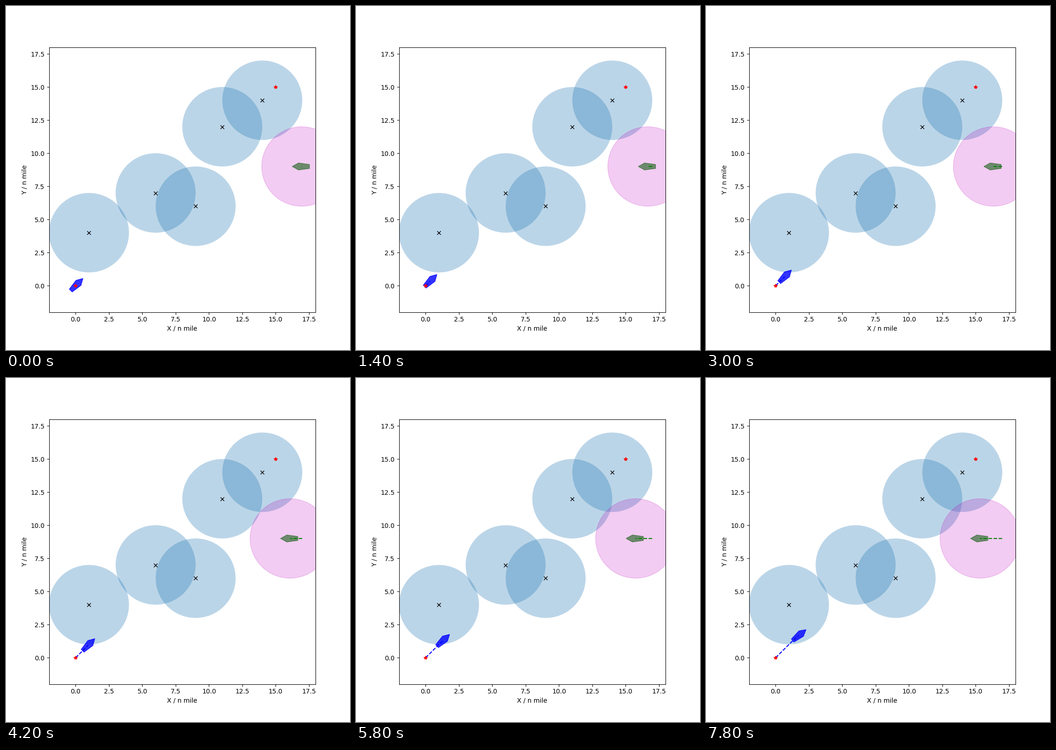
Animation, 748 px wide and 748 px high, one loop 8000 ms. Source, as a matplotlib script:

```python
import numpy as np
import matplotlib.pyplot as plt
from matplotlib.animation import FuncAnimation
from matplotlib.patches import Circle, Polygon

FRAMES, INTERVAL = 40, 200
RADIUS = 3
OBSTACLES = [(1, 4), (6, 7), (9, 6), (11, 12), (14, 14)]
START, GOAL = (0, 0), (15, 15)
OTHER_START = (17, 9)

# Hull outline with the bow along +x
HULL = np.array([(0.71, 0), (0.24, 0.265), (-0.58, 0.15),
                 (-0.58, -0.15), (0.24, -0.265)])


def track(start, speed, headings):
    steps = speed * np.column_stack([np.cos(headings), np.sin(headings)])
    return np.vstack([start, start + np.cumsum(steps, axis=0)])


def hull_at(pos, heading):
    c, s = np.cos(heading), np.sin(heading)
    return HULL @ np.array([[c, s], [-s, c]]) + pos


# Own ship holds 45 degrees, then eases to starboard
n = np.arange(FRAMES)
turn = 5.6 * (np.clip(n - 22, 0, None) / 17) ** 1.4
own_heading = np.radians(45 - turn)
own_track = track(START, 0.06, own_heading)
other_heading = np.full(FRAMES, np.pi)
other_track = track(OTHER_START, 15 / 360, other_heading)

plt.rcParams["font.family"] = "DejaVu Sans"
fig, ax = plt.subplots(figsize=(7.48, 7.48), dpi=100)
ax.set(xlim=(-2, 18), ylim=(-2, 18), xlabel="X / n mile", ylabel="Y / n mile")

for center in OBSTACLES:
    ax.add_patch(Circle(center, RADIUS, alpha=0.3))
    ax.plot(*center, "kx")

own = ax.add_patch(Polygon(HULL, color="b", alpha=0.8))
other = ax.add_patch(Polygon(HULL, color="g", alpha=0.65))
zone = ax.add_patch(Circle(OTHER_START, RADIUS, color="m", alpha=0.2))

own_path, = ax.plot([], [], "b--")
other_path, = ax.plot([], [], "g--")
for point in (START, GOAL):
    ax.plot(*point, "r*")


def update(i):
    own.set_xy(hull_at(own_track[i + 1], own_heading[i]))
    other.set_xy(hull_at(other_track[i + 1], other_heading[i]))
    zone.center = other_track[i + 1]
    own_path.set_data(*own_track[:i + 2].T)
    other_path.set_data(*other_track[:i + 2].T)
    return own, other, zone, own_path, other_path


anim = FuncAnimation(fig, update, frames=FRAMES, interval=INTERVAL,
                     repeat=True, repeat_delay=0)
plt.show()
```
